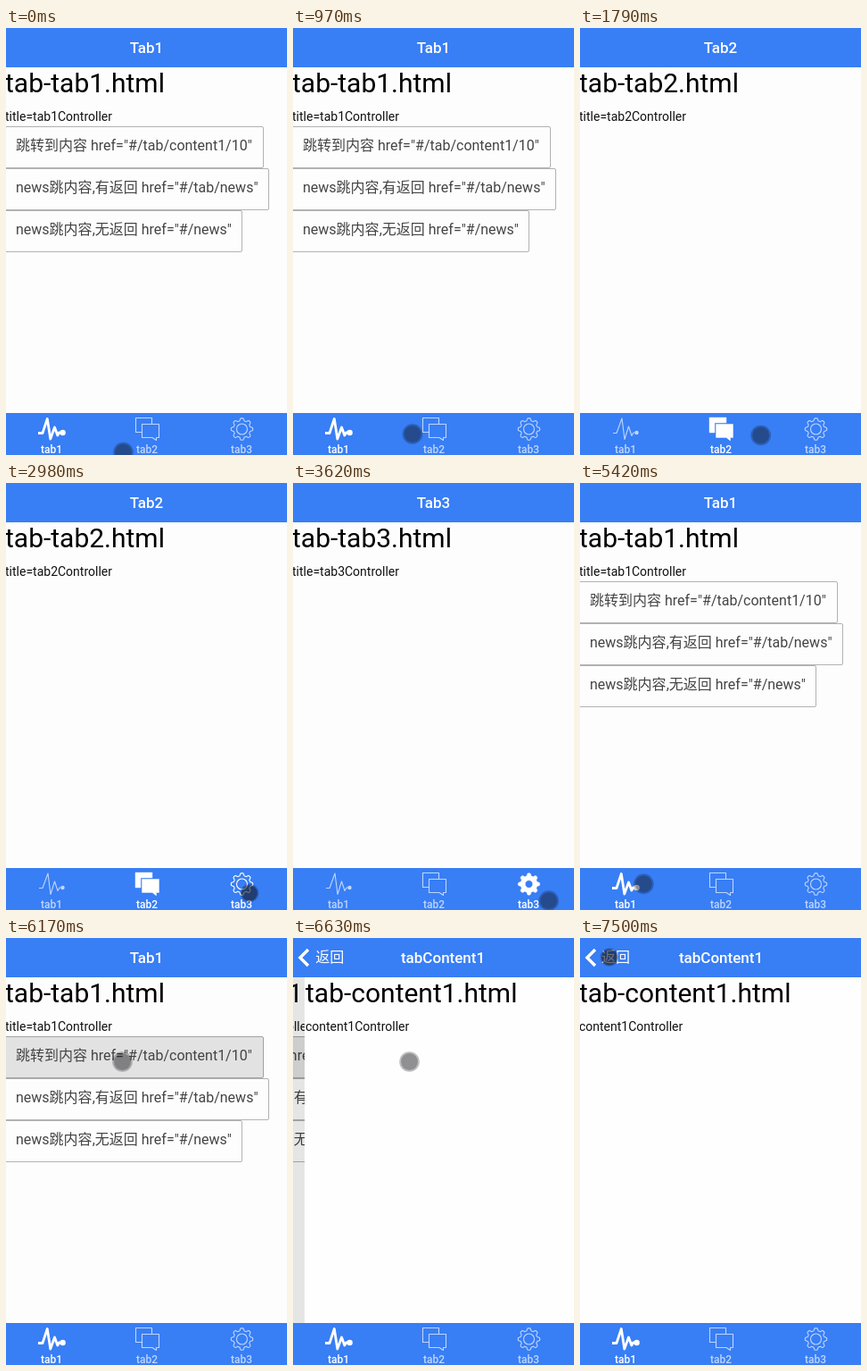
An HTML page that plays this animation: 315x478 px, repeating every 8000 ms.

```html
<!DOCTYPE html>
<html lang="zh">
<head>
<meta charset="utf-8">
<title>Tabs</title>
<style>
  html, body { margin: 0; width: 100%; height: 100%; overflow: hidden; background: #fdfdfd; }
  svg { display: block; width: 315px; height: 478px; font-family: Roboto, "Noto Sans CJK SC", sans-serif; }
  text { white-space: pre; }
  .h1 { font-size: 30px; }
  .p { font-size: 14px; fill: #111; }
  .btn rect { fill: #fdfdfd; stroke: #b2b2b2; }
  .btn text { font-size: 16px; fill: #444; }
  .btn.down rect { fill: #e2e2e2; stroke: #a2a2a2; }
  .cjk { font-weight: 300; }
  .bar { fill: #387ef5; }
  .title { font-size: 17px; font-weight: 500; fill: #fff; text-anchor: middle; }
  .tab { opacity: .68; }
  .tab.on, .tab.down { opacity: 1; }
  .tab text { font-size: 12px; font-weight: 500; fill: #fff; text-anchor: middle; }
  .line, .full { stroke: #fff; stroke-linejoin: round; }
  .line { fill: none; stroke-width: 1.1; }
  .full { fill: none; stroke-width: 2.8; display: none; }
  .full.solid { fill: #fff; fill-rule: evenodd; stroke-width: .4; }
  .tab .dot { fill: #fff; stroke: none; }
  .on .full { display: inline; }
  .on .line { display: none; }
</style>
</head>
<body>
<svg viewBox="0 0 315 478">
  <rect width="315" height="478" fill="#fdfdfd"/>
  <g id="home">
    <text id="heading" class="h1" x="-1" y="72"></text>
    <text id="note" class="p" x="-1" y="104"></text>
    <g id="buttons"></g>
  </g>
  <rect id="shade" y="44" width="315" height="387"/>
  <g id="detail">
    <rect x="-2" y="44" width="319" height="387" fill="#fefefe"/>
    <text class="h1" x="-1" y="72">tab-content1.html</text>
    <text class="p" x="-1" y="104">content1Controller</text>
  </g>
  <rect class="bar" width="315" height="44"/>
  <text id="title" class="title" x="157.5" y="28"></text>
  <text id="detailTitle" class="title" x="158" y="28">tabContent1</text>
  <g id="back" fill="#fff">
    <path d="M17 13L8 22L17 31" fill="none" stroke="#fff" stroke-width="3.4"/>
    <text id="backText" class="cjk" x="24" y="27" font-size="16">返回</text>
  </g>
  <rect class="bar" y="431" width="315" height="47"/>
  <g class="tab">
    <path class="line" d="M37 453.5H41L47 437L50 460.5L54.5 446L58 456.5L60 453H63"/>
    <circle class="dot line" cx="63.5" cy="453" r="2.2"/>
    <path class="full" d="M36 453.5H41L46.3 437.5L49.8 460L54.5 447L57.8 456L59.5 453H63"/>
    <circle class="dot full" cx="63.6" cy="453" r="3.2"/>
    <text x="51" y="476">tab1</text>
  </g>
  <g class="tab">
    <path class="line" d="M152.5 452.5H145.5V436.5H163.5V443.5M152.5 443.5H171.5V458.5H168.5V461.5L164 458.5H152.5Z"/>
    <path class="full solid" d="M145 436H164V442H151V453H145ZM152.5 443.5H171.5V458.5H168.5V462L164 458.5H152.5Z"/>
    <text x="158" y="476">tab2</text>
  </g>
  <g class="tab">
    <path class="line gear" data-hole="6"/>
    <path class="full solid gear" data-hole="4.2"/>
    <text x="264" y="476">tab3</text>
  </g>
  <circle id="halo"/>
  <circle id="pointer"/>
</svg>
<script>
const LOOP = 8000;
const STEP = 130;          // pointer refresh, ms
const WIDTH = 319;
const BUTTON_DOWN = 6170, SLIDE = 6480, BACK_DOWN = 7500;

const $ = id => document.getElementById(id);
const set = (el, attrs) => { for (const k in attrs) el.setAttribute(k, attrs[k]); };
const ease = u => (1 - Math.cos(Math.PI * u)) / 2;

const taps = [
  { down: 1240, up: 1520, tab: 1 },
  { down: 2980, up: 3100, tab: 2 },
  { down: 4440, up: 4710, tab: 0 }
];

// pointer moves: start time, steps, destination
const moves = [
  [0, 1, 131.5, 475],
  [150, 4, 62, 456],
  [580, 6, 158, 454],
  [1520, 7, 273, 459],
  [3100, 2, 303, 468],
  [3500, 6, 59.5, 462.5],
  [5300, 3, 107, 408],
  [5700, 3, 130.5, 138.5],
  [6920, 5, 33, 21.5]
];

function pointerAt(t) {
  const i = moves.findLastIndex(m => m[0] <= t);
  const [start, steps, x, y] = moves[i];
  const [, , x0, y0] = moves[Math.max(0, i - 1)];
  const u = ease(Math.min(1, (Math.floor((t - start) / STEP) + 1) / steps));
  return [x0 + (x - x0) * u, y0 + (y - y0) * u];
}

// distance the incoming page still has to slide
function slideLeft(t) {
  if (t < SLIDE) return WIDTH;
  return Math.round(WIDTH / 4 * 0.19 ** Math.floor((t - SLIDE) / 150));
}

const labels = [
  ['跳转到内容 href="#/tab/content1/10"', 288.5],
  ['news跳内容,有返回 href="#/tab/news"', 294.5],
  ['news跳内容,无返回 href="#/news"', 264.5]
];
$('buttons').innerHTML = labels.map(([label, right], i) => {
  const y = 110.5 + 47 * i;
  const text = label.replace(/[\u4e00-\u9fff]+/g, '<tspan class="cjk">$&</tspan>');
  return `<g class="btn"><rect x="-2.5" y="${y}" width="${right + 2.5}" height="46" rx="1.5"/>` +
    `<text x="11" y="${y + 26.5}">${text}</text></g>`;
}).join('');

function gear(hole) {
  const cx = 264.5, cy = 449, n = 96;
  const points = Array.from({ length: n }, (_, k) => {
    const a = 2 * Math.PI * k / n;
    const r = 10.8 + 1.4 * Math.tanh(2.5 * Math.cos(8 * a));
    return `${(cx + r * Math.sin(a)).toFixed(2)} ${(cy - r * Math.cos(a)).toFixed(2)}`;
  });
  const arc = dx => `a${hole} ${hole} 0 1 0 ${dx} 0`;
  return `M${points.join('L')}ZM${cx - hole} ${cy}${arc(2 * hole)}${arc(-2 * hole)}Z`;
}
document.querySelectorAll('.gear').forEach(el => el.setAttribute('d', gear(+el.dataset.hole)));

const tabs = document.querySelectorAll('.tab');
const firstButton = document.querySelector('.btn');

function drawTabs(t, page, press) {
  tabs.forEach((el, i) => {
    el.classList.toggle('on', i === page);
    el.classList.toggle('down', i === press);
  });
  $('heading').textContent = `tab-tab${page + 1}.html`;
  $('note').textContent = `title=tab${page + 1}Controller`;
  $('title').textContent = `Tab${page + 1}`;
  $('buttons').style.display = page ? 'none' : '';
  firstButton.classList.toggle('down', t >= BUTTON_DOWN);
}

function drawSlide(t) {
  const left = slideLeft(t);
  const done = 1 - left / WIDTH;
  set($('home'), { transform: `translate(${-104 * done} 0)` });
  set($('shade'), { opacity: .1 * done });
  set($('detail'), { transform: `translate(${left} 0)` });

  const fade = Math.min(1, done * 1.05);
  set($('title'), { opacity: 1 - fade, x: 157.5 - 120 * done });
  set($('detailTitle'), { opacity: fade, x: 158 + left * .67 });
  set($('back'), { opacity: fade });
  set($('backText'), { x: 24 + left * .08 });
}

function drawPointer(t, pressed) {
  const [cx, cy] = pointerAt(t);
  set($('halo'), { cx, cy, r: pressed ? 10.3 : 11.3, fill: 'rgba(10,10,20,.26)' });
  set($('pointer'), { cx, cy, r: pressed ? 8.8 : 9.4, fill: `rgba(20,20,25,${pressed ? .45 : .28})` });
}

function draw(t) {
  const page = taps.findLast(tap => tap.up <= t)?.tab ?? 0;
  const press = taps.find(tap => tap.down <= t && t < tap.up)?.tab ?? -1;
  drawTabs(t, page, press);
  drawSlide(t);
  drawPointer(t, press >= 0 || t >= BACK_DOWN);
}

const start = performance.now();
function tick() {
  draw((performance.now() - start) % LOOP);
  requestAnimationFrame(tick);
}
tick();
</script>
</body>
</html>
```
